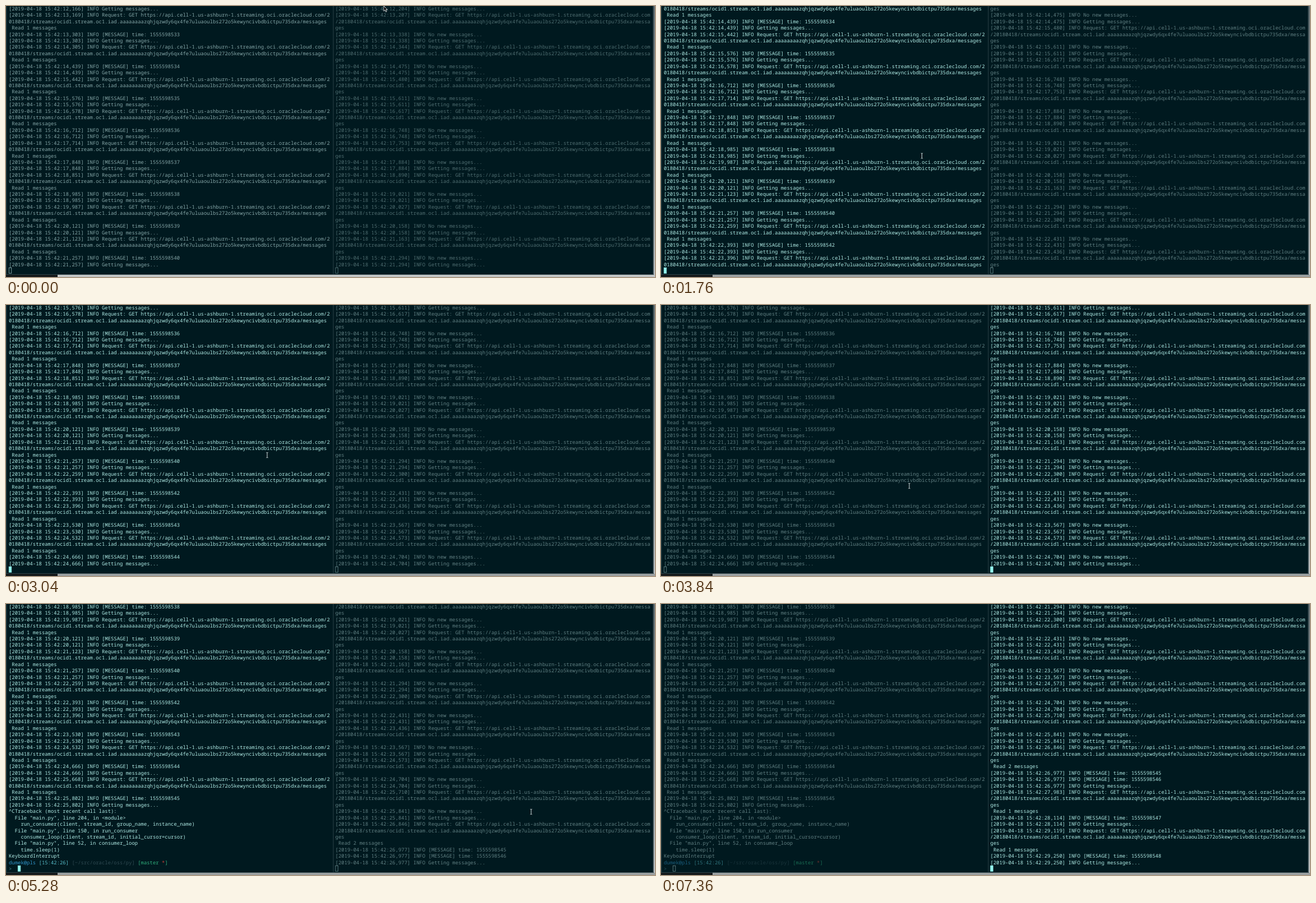
Recreate the animation shown at these times as an HTML page. Size 1158 by 484 pixels, loop 7680 ms.

```html
<!DOCTYPE html>
<html lang="en">
<head>
<meta charset="utf-8">
<title>Stream consumers</title>
<style>
  html, body { margin: 0; width: 100%; height: 100%; overflow: hidden; background: #00191f; }
  svg { display: block; width: 1158px; height: 484px; }
  text {
    font: 8.935px "Noto Sans Mono", "DejaVu Sans Mono", monospace;
    white-space: pre;
    text-rendering: geometricPrecision;
  }
</style>
</head>
<body>
<svg viewBox="0 0 1158 484">
  <defs>
    <linearGradient id="edge" x1="0" y1="0" x2="0" y2="1">
      <stop offset="0" stop-color="#6a7477"/>
      <stop offset="0.5" stop-color="#8f9698"/>
      <stop offset="1" stop-color="#bfc2c3"/>
    </linearGradient>
  </defs>
  <rect width="1158" height="484" fill="#00191f"/>
  <rect x="0" width="1.5" height="480" fill="#20383e"/>
  <rect x="583.5" width="1" height="479" fill="#2c4248"/>
  <rect x="1154" width="1" height="480" fill="#2c4248"/>
  <rect x="1155.5" width="2.5" height="484" fill="url(#edge)"/>
  <rect y="479" width="1156" height="1" fill="#2c4248"/>
  <rect y="480" width="92" height="4" fill="#14191b"/>
  <rect id="shade" x="92" y="480" width="1066" height="4"/>
  <g id="panes"></g>
  <g id="pointer">
    <path id="arrow" d="M0 0V9.2L2.2 7.2L3.8 10.6L5.3 9.9L3.8 6.6H6.6Z" fill="#000" stroke="#e8eeee" stroke-width="0.9"/>
    <path id="beam" d="M-1.6 -4.6Q0 -4.6 0 -3.6Q0 -4.6 1.6 -4.6M0 -3.6V3.8M-1.6 4.8Q0 4.8 0 3.8Q0 4.8 1.6 4.8" fill="none" stroke="#d5dddd" stroke-width="1"/>
  </g>
</svg>
<script>
const LOOP = 7680, STEP = 160, ROWS = 42, PITCH = 11.415, CHAR = 5.361;
const NS = "http://www.w3.org/2000/svg";
const INK = "#b0ebe5", DIM_INK = "#b0d2d2", CARET = "#93f3ec";
const URL_TEXT = "https://api.cell-1.us-ashburn-1.streaming.oci.oraclecloud.com/20180418/streams/" +
  "ocid1.stream.oc1.iad.aaaaaaaazqhjqzwdy6qx4fe7uluaoulbs272o5kewyncivbdbictpu735dxa/messages";
const INTERRUPT = 4800, SHELL = INTERRUPT + STEP;
const HISTORY = 8, LEFT_POLLS = 12;

const TRACEBACK = [
  "^CTraceback (most recent call last):",
  '  File "main.py", line 204, in <module>',
  "    run_consumer(client, stream_id, group_name, instance_name)",
  '  File "main.py", line 150, in run_consumer',
  "    consumer_loop(client, stream_id, initial_cursor=cursor)",
  '  File "main.py", line 52, in consumer_loop',
  "    time.sleep(1)",
  "KeyboardInterrupt"
];
const PROMPT = [
  [["dumek@pls", "#2f93c8"], [" [15:42:26]", "#58bcc8"], [" [~/src/oracle/oss/py]", "#2f4a52"],
    [" [master ", "#2fae7c"], ["*", "#d0403a"], ["]", "#2fae7c"]],
  [[">  ", "#4b8791"]]
];

const $ = id => document.getElementById(id);

function add(parent, tag, attrs = {}) {
  const node = document.createElementNS(NS, tag);
  set(node, attrs);
  parent.append(node);
  return node;
}

function set(node, attrs) {
  for (const key in attrs) node.setAttribute(key, attrs[key]);
}

function stamp(ms, text) {
  const clock = (ms / 1000).toFixed(3).replace(".", ",");
  return `[2019-04-18 15:42:${clock}] INFO ${text}`;
}

function wrap(text, cols) {
  const rows = [];
  for (let i = 0; i < text.length; i += cols) rows.push(text.slice(i, i + cols));
  return rows;
}

// Messages carry the whole second in which they were sent.
const message = i => "[MESSAGE] time: " + (1555598533 + Math.floor(i * 1.136));

const received = (ms, ids) =>
  [` Read ${ids.length} messages`, ...ids.map(i => stamp(ms, message(i)))];

// The right consumer takes over once the left one has stopped.
function takeOver(ms, i) {
  if (i < LEFT_POLLS) return [stamp(ms, "No new messages...")];
  return received(ms, i === LEFT_POLLS ? [i - 1, i] : [i]);
}

const LEFT_LOG = { first: 13169, period: 1136.3, delay: 134, cols: 107, polls: LEFT_POLLS,
  reply: (ms, i) => received(ms, [i]) };
const RIGHT_LOG = { first: 13207, period: 1136.6, delay: 131, cols: 105, polls: Infinity,
  reply: takeOver };

function logLines(log, t) {
  const lines = [stamp(log.first - 1003, "Getting messages...")];
  for (let i = 0; i < log.polls; i++) {
    const shown = i < HISTORY ? -STEP : 640 + (i - HISTORY) * 1093;
    if (t < shown) break;
    const asked = Math.round(log.first + i * log.period), got = asked + log.delay;
    lines.push(...wrap(stamp(asked, "Request: GET " + URL_TEXT), log.cols));
    if (t < shown + STEP) break;
    lines.push(...log.reply(got, i), stamp(got, "Getting messages..."));
  }
  return lines;
}

function leftLines(t) {
  const lines = logLines(LEFT_LOG, t);
  if (t >= INTERRUPT) lines.push(...TRACEBACK);
  return lines.concat(t >= SHELL ? PROMPT : [""]);
}

const rightLines = t => [...logLines(RIGHT_LOG, t), ""];

function makePane(x) {
  const g = add($("panes"), "g");
  const rows = Array.from({ length: ROWS }, (_, i) =>
    add(g, "text", { x, y: (8 + i * PITCH).toFixed(2) }));
  const caret = add(g, "rect", { y: 467.5, width: 4.4, height: 9.8, "stroke-width": 0.9 });
  return { g, rows, caret, x };
}

const left = makePane(5), right = makePane(587.6);

function drawPane(pane, lines, active, opacity) {
  const view = lines.slice(-ROWS), ink = active ? INK : DIM_INK;
  pane.rows.forEach((row, i) => {
    const parts = typeof view[i] === "string" ? [[view[i], ink]] : view[i];
    row.replaceChildren();
    for (const [text, fill] of parts) add(row, "tspan", { fill }).textContent = text;
  });
  set(pane.caret, {
    x: pane.x + 0.3 + pane.rows[ROWS - 1].textContent.length * CHAR,
    fill: active ? CARET : "none",
    stroke: active ? CARET : ink
  });
  set(pane.g, { opacity });
}

function focusAt(t) {
  if (t < 480) return "none";
  if (t < 3520) return "left";
  if (t < 4160) return "right";
  return t < 5600 ? "left" : "right";
}

// Pointer moves: start, end, and where it comes to rest.
const MOVES = [[0, 800, 465, 267], [960, 2560, 466, 268], [3360, 3840, 443, 323],
  [4800, 5280, 937, 371], [5280, 5760, 893, 474], [5760, 5920, 917, 475]];

function pointerAt(t) {
  let x = 674, y = 0;
  for (const [from, to, toX, toY] of MOVES) {
    const u = Math.min(1, Math.max(0, (t - from) / (to - from)));
    const ease = u * u * (3 - 2 * u);
    x += (toX - x) * ease;
    y += (toY - y) * ease;
  }
  return [x, y];
}

function drawPointer(t) {
  const [x, y] = pointerAt(t);
  const arrow = t < 480 || y > 470;
  set($("pointer"), {
    visibility: t < 6240 ? "visible" : "hidden",
    transform: `translate(${x.toFixed(1)} ${y.toFixed(1)})`
  });
  set($("arrow"), { display: arrow ? "inline" : "none" });
  set($("beam"), { display: arrow ? "none" : "inline" });
}

function draw(t) {
  const focus = focusAt(t), away = focus === "none";
  drawPane(left, leftLines(t), focus === "left", away ? 0.76 : focus === "left" ? 1 : 0.55);
  drawPane(right, rightLines(t), focus === "right", away ? 0.45 : focus === "right" ? 1 : 0.55);
  set($("shade"), { fill: away ? "#c2c5c5" : "#9a9fa0" });
  drawPointer(t);
}

let shownAt = -1;
const start = performance.now();
function tick() {
  const t = Math.floor(((performance.now() - start) % LOOP) / STEP) * STEP;
  if (t !== shownAt) draw(shownAt = t);
  requestAnimationFrame(tick);
}
tick();
</script>
</body>
</html>
```
